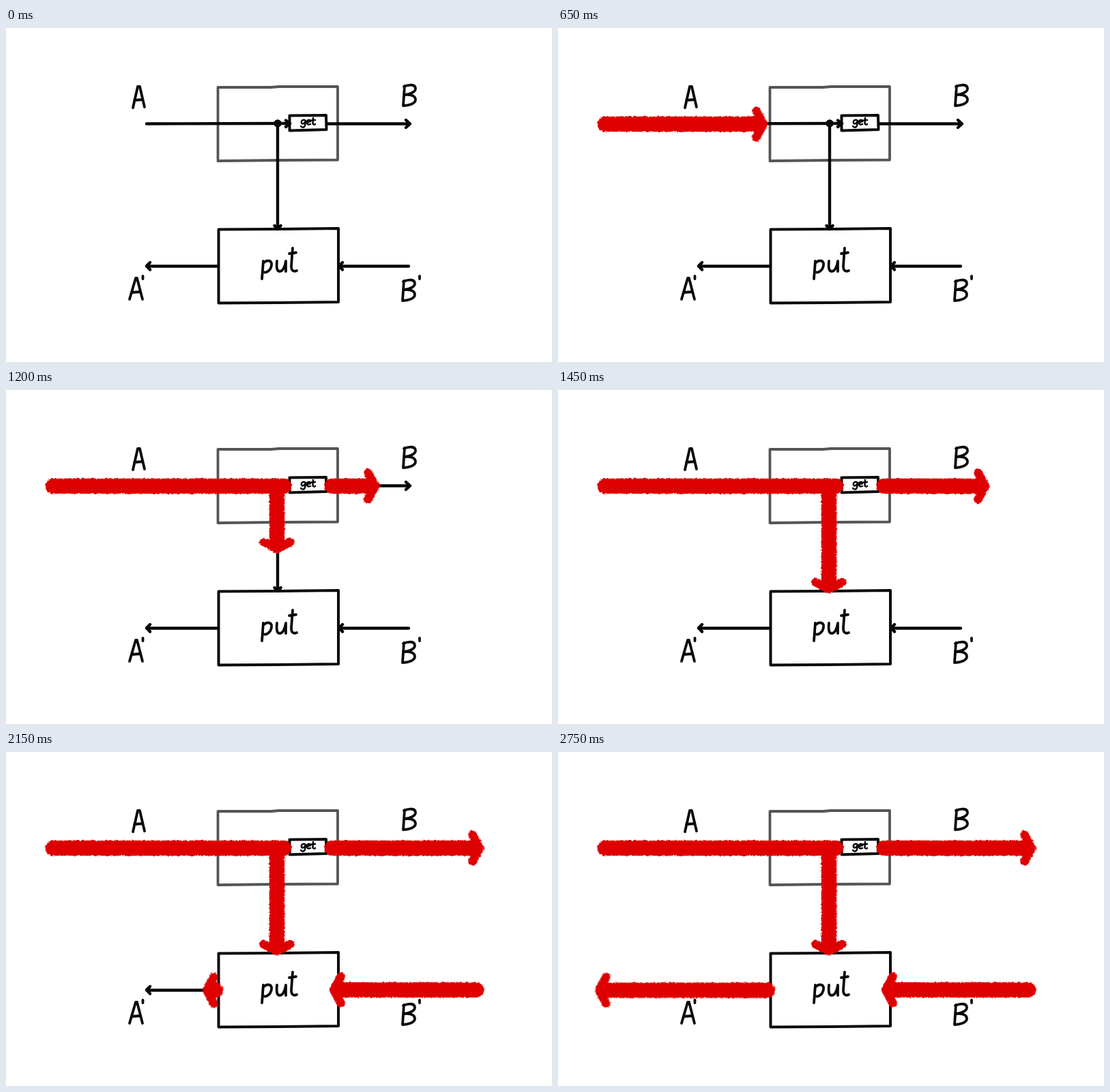
An HTML page for the animation above (2800 ms loop, 800 px wide and 490 px high).

```html
<!DOCTYPE html>
<html lang="en">
<head>
<meta charset="utf-8">
<title>get / put</title>
<style>
  @property --d { syntax: "<number>"; inherits: true; initial-value: 40; }
  html, body { margin: 0; width: 100%; height: 100%; overflow: hidden; background: #fff; }
  svg { display: block; width: 800px; height: 490px; }
  .ink { fill: none; stroke: #080808; stroke-width: 4.4; stroke-linecap: round; stroke-linejoin: round; }
  .box { stroke-width: 4; }
  .pen { stroke-width: 3.8; }
  .flow { fill: none; stroke: #de0000; stroke-linecap: round; stroke-linejoin: round; }

  /* --d is the distance from tail to tip */
  .arrow { animation: 2800ms -6ms linear infinite; }
  .shaft { stroke-width: 22.6; stroke-dasharray: max(.01px, calc(var(--d) * 1px - 25px)) 999px; }
  .head { stroke-width: 12.5; transform: translateX(calc(var(--d) * 1px)); }
  #in { animation-name: in; }
  #in .head { animation: split 2800ms -6ms linear infinite; }
  #down { animation-name: down; }
  #out { animation-name: out; }
  #back { animation-name: back; }
  #result { animation-name: result; }

  /* one step lasts 50 ms = 1.7857% */
  @keyframes in {
    0%, 1.785% { --d: 46; opacity: 0; }
    1.786% { --d: 46; opacity: 1; animation-timing-function: steps(19); }
    35.713% { --d: 369; opacity: 1; }
    35.714%, 100% { --d: 363; opacity: 1; }
  }
  @keyframes split {
    0%, 35.713% { opacity: 1; }
    35.714%, 100% { opacity: 0; }
  }
  @keyframes down {
    0%, 35.713% { --d: 42; opacity: 0; }
    35.714% { --d: 42; opacity: 1; animation-timing-function: steps(8); }
    49.999% { --d: 178; opacity: 1; }
    50%, 100% { --d: 169; opacity: 1; }
  }
  @keyframes out {
    0%, 37.499% { --d: 30; opacity: 0; }
    37.5% { --d: 30; opacity: 1; animation-timing-function: steps(12); }
    58.929%, 100% { --d: 234; opacity: 1; }
  }
  @keyframes back {
    0%, 53.57% { --d: 25; opacity: 0; }
    53.571% { --d: 25; opacity: 1; animation-timing-function: steps(12); }
    75%, 100% { --d: 227; opacity: 1; }
  }
  @keyframes result {
    0%, 76.785% { --d: 31; opacity: 0; }
    76.786% { --d: 31; opacity: 1; animation-timing-function: steps(12); }
    98.214%, 100% { --d: 265; opacity: 1; }
  }
</style>
</head>
<body>
<svg viewBox="0 0 800 490" role="img" aria-label="A goes through get to B; A and B' go through put to A'">
  <defs>
    <filter id="rough" filterUnits="userSpaceOnUse" x="0" y="0" width="800" height="490" color-interpolation-filters="sRGB">
      <feTurbulence type="fractalNoise" baseFrequency=".35" numOctaves="2" seed="4"/>
      <feDisplacementMap in="SourceGraphic" scale="3.5" xChannelSelector="R" yChannelSelector="G"/>
    </filter>
    <path id="B" d="M584 85L582 114M583 86C592 82 600 83 600 89C600 94 592 97 585 98C596 97 600 101 600 105C600 111 590 114 582 114"/>
    <path id="shaft" d="M11.5 0H700"/>
    <path id="head" d="M-17-19.5L-6.5 0L-17 19.5"/>
    <g id="arrow">
      <use class="shaft" href="#shaft"/>
      <use class="head" href="#head"/>
    </g>
  </defs>

  <path class="ink" style="stroke:#555;stroke-width:3.8" d="M310.5 87L388 87L400 86L486 86L486 193.5L400 194L310.5 195Z"/>

  <g class="ink">
    <path d="M206 140.5L398 140H415M410 135.5L416 140L410 145"/>
    <path d="M398 140V294M393.5 290L398 295L402.5 290"/>
    <circle cx="398" cy="140" r="3.6" fill="#080808"/>
    <path class="box" d="M415.5 128.5L469 128L469.5 149L415.5 150.5Z"/>
    <path d="M471 140.5H591M586 135L592 140.5L586 146"/>
    <path class="box" d="M311.5 295.5L400 295L487 294L487 402L400 403L311.5 403.5Z"/>
    <path d="M311 349.5H206M211 344L206 349L211 354.5"/>
    <path d="M590 349.5H488M493 344L488 349L493 354.5"/>
  </g>

  <g class="ink pen">
    <path d="M186 117L193 86H196L203 116M188 106L200 105"/>
    <path d="M181 398L190 367H192L200 398M184 388L197 387M200.5 364V368"/>
    <use href="#B"/>
    <use href="#B" x="-1" y="286"/>
    <path d="M606 364V368"/>
    <path d="M377 342L375 368M377 345C383 339 390 341 389 348C388 356 381 360 377 358"/>
    <path d="M397 342C396 352 397 357 401 357C406 357 409 349 410 342L410 357"/>
    <path d="M420 323L418 349C418 356 421 358 426 356M415 331L425 329.5"/>
    <path style="stroke-width:2.5" d="M439 136C436 133 432 136 433 139C434 142 438 140 439 136L438 143C437 147 433 146 432 144M441 138.5L446 137C445 133 441 135 441 138.5C441 142 444 142 446 141M450 132L449.5 140C450 142 452 142 453 141M447 135.5L453 135"/>
  </g>

  <g class="flow" filter="url(#rough)">
    <g transform="translate(57.5 141)"><g class="arrow" id="in"><use class="shaft" href="#shaft"/><use class="head" href="#head"/></g></g>
    <g transform="translate(397 130) rotate(90)"><g class="arrow" id="down"><use href="#arrow"/></g></g>
    <g transform="translate(466.5 141)"><g class="arrow" id="out"><use href="#arrow"/></g></g>
    <g transform="translate(700.5 349) rotate(180)"><g class="arrow" id="back"><use href="#arrow"/></g></g>
    <g transform="translate(318.5 349.5) rotate(180)"><g class="arrow" id="result"><use href="#arrow"/></g></g>
  </g>
</svg>
</body>
</html>
```
